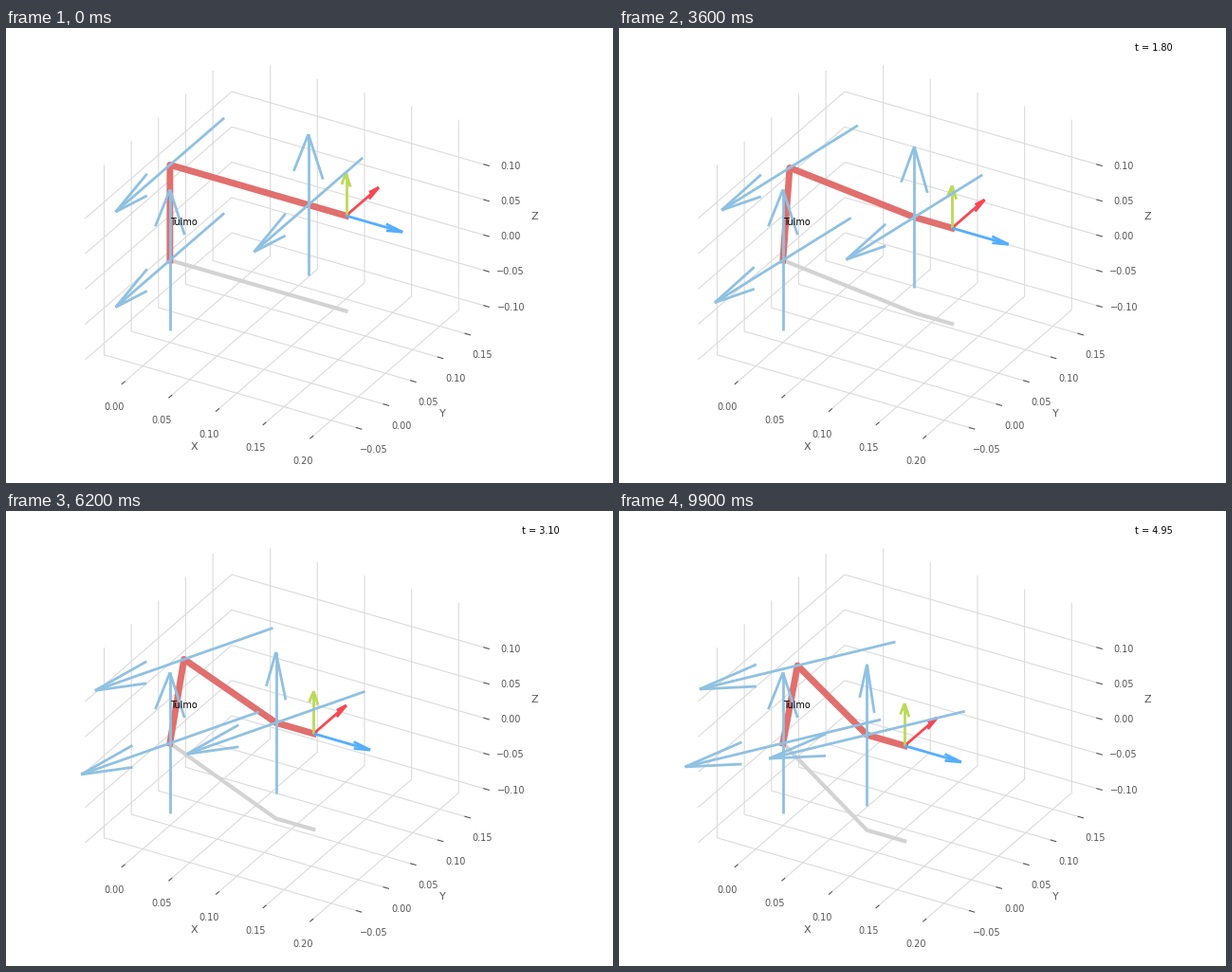
Recreate the animation shown at these times as a matplotlib script. Size 640x480 px, loop 10 s.

```python
import numpy as np
import matplotlib.pyplot as plt
from matplotlib.animation import FuncAnimation
from matplotlib.collections import LineCollection

plt.rcParams["font.family"] = "DejaVu Sans"
plt.rcParams["font.size"] = 7

W, H, FRAMES, DT = 640, 480, 100, 0.05
GREY, GRID, JOINT = "#555555", "#dbdbdb", "#8FC1E2"

# Orthographic view, azimuth -60, elevation 30, box aspect 4:4:3
SPAN = 0.2694
MID = np.array([0.0937, 0.0499, 0.0182])
LO, HI = MID - SPAN / 2, MID + SPAN / 2
SCALE = 993 / np.cos(np.pi / 6)
VIEW = SCALE * np.array([[0.866, 0.5, 0.0], [0.25, -0.433, -0.6495]])
CENTRE = np.array([294.5, 233.5])


def project(points):
    return CENTRE + (np.asarray(points, float) - MID) @ VIEW.T


fig = plt.figure(figsize=(W / 100, H / 100), dpi=100, facecolor="white")
ax = fig.add_axes([0, 0, 1, 1])
ax.set(xlim=(0, W), ylim=(H, 0))
ax.axis("off")


def lines(segments, color, width, z):
    coll = LineCollection(segments, colors=color, linewidths=width, zorder=z)
    ax.add_collection(coll, autolim=False)
    return coll


def point(axis, value, rest):
    p = np.array(rest, float)
    p[axis] = value
    return p


def draw_axis(axis, ticks, wall, tick_dir, pad_dir):
    """Grid lines, ticks and labels; wall lists the three grid corners."""
    grid, marks = [], []
    edge = wall[-1] if axis == 2 else wall[0]
    for value in ticks:
        grid.append(project([point(axis, value, c) for c in wall]))
        p = point(axis, value, edge)
        out = np.array(tick_dir) * SPAN / 125
        marks.append(project([p - out, p + 2 * out]))
        u, v = project(p + 0.0171 * np.array(pad_dir))
        label = f"{value:.2f}".replace("-", "\u2212")
        ax.text(u, v, label, color=GREY, ha="center", va="top")
    lines(grid, GRID, 0.8, 1)
    lines(marks, GREY, 0.8, 1.1)


(x0, y0, z0), (x1, y1, z1) = LO, HI
step = 0.05
draw_axis(0, step * np.arange(5), [(0, y0, z0), (0, y1, z0), (0, y1, z1)],
          (0, -1, 0), (0, -1, -1))
draw_axis(1, step * np.arange(-1, 4), [(x1, 0, z0), (x0, 0, z0), (x0, 0, z1)],
          (1, 0, 0), (1, 0, -1))
draw_axis(2, step * np.arange(-2, 3), [(x0, y0, 0), (x0, y1, 0), (x1, y1, 0)],
          (1, 0, 0), (1, 1, 0))
for name, u, v in (("X", 198.4, 445), ("Y", 460.2, 410), ("Z", 557.3, 202.3)):
    ax.text(u, v, name, color=GREY, size=8, ha="center")

# Arm geometry
L1, L2, L3 = 0.135, 0.147, 0.040
EX, EY, EZ = np.eye(3)


def solve(x, y, z):
    """Base angle and elevations of both links for a wrist position."""
    r = np.hypot(x, y)
    d = np.hypot(r, z)
    upper = np.arctan2(z, r) + np.arccos((L1**2 + d**2 - L2**2) / (2 * L1 * d))
    fore = np.arctan2(z - L1 * np.sin(upper), r - L1 * np.cos(upper))
    return np.array([np.arctan2(y, x), upper, fore])


START = solve(L2, 0, L1)
END = solve(L2, -0.1, L1)


def pose(n):
    t = n / (FRAMES - 1)
    s = t**3 * (10 - 15 * t + 6 * t * t)
    return START + s * (END - START)


def arrow(tail, vec, side):
    """Shaft and two head strokes, the head opening along side."""
    tip = tail + vec
    back = 0.3 * np.cos(np.radians(15)) * vec
    wing = 0.3 * np.sin(np.radians(15)) * np.linalg.norm(vec) * side
    return [project(s) for s in
            ((tail, tip), (tip, tip - back + wing), (tip, tip - back - wing))]


def axis_arrow(centre, direction, side):
    return arrow(centre - 0.1 * direction, 0.2 * direction, side)


shadow, = ax.plot([], [], color="lightgrey", lw=3, zorder=2)
arm, = ax.plot([], [], color="#E16F6D", lw=5, zorder=2.1)
tool = [lines([], c, 2, 4) for c in ("#F84752", "#BADA55", "#54AEFF")]
joints = lines([], JOINT, 2, 5)
ax.text(*project((0, 0, 0.05)), "Tulmo", color="black", zorder=6)
clock = ax.text(0.85 * W, 0.05 * H, "", color="black", zorder=6)


def update(n):
    turn, upper, fore = pose(n)
    radial = np.array([np.cos(turn), np.sin(turn), 0])
    hinge = np.array([np.sin(turn), -np.cos(turn), 0])
    base = np.zeros(3)
    elbow = L1 * (np.cos(upper) * radial + np.sin(upper) * EZ)
    wrist = elbow + L2 * (np.cos(fore) * radial + np.sin(fore) * EZ)
    hand = wrist + L3 * EX

    chain = np.array([base, elbow, wrist, hand])
    arm.set_data(*project(chain).T)
    shadow.set_data(*project(chain * [1, 1, 0]).T)

    strokes = axis_arrow(base, EZ, EX) + axis_arrow(wrist, EZ, radial)
    for p in (base, elbow, wrist):
        strokes += axis_arrow(p, hinge, EZ)
    joints.set_segments(strokes)

    for coll, d, side in zip(tool, (EY, EZ, EX), (EZ, EX, EZ)):
        coll.set_segments(arrow(hand, 0.06 * d, side))
    clock.set_text(f"t = {n * DT:.2f}" if n else "")
    return [arm, shadow, joints, clock, *tool]


anim = FuncAnimation(fig, update, frames=FRAMES, interval=100,
                     repeat=True, repeat_delay=0, blit=False)
plt.show()
```
